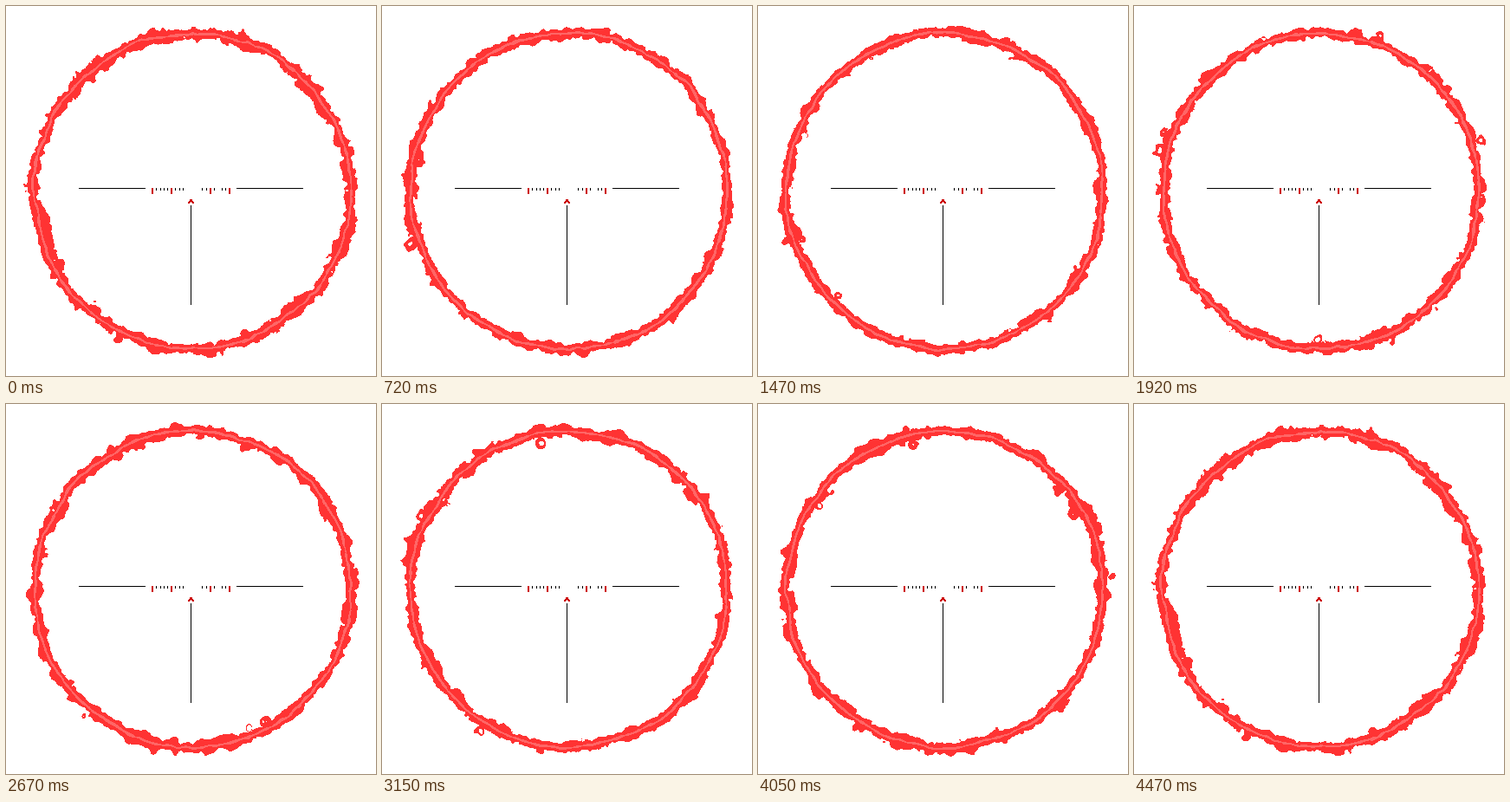
These frames come from a looping animation (427x427 px, 4.5 s). An HTML page with a canvas:

```html
<!DOCTYPE html>
<html lang="en">
<head>
<meta charset="utf-8">
<title>Burning scope</title>
<style>
html, body { margin: 0; width: 100%; height: 100%; overflow: hidden; background: #fff; }
canvas { display: block; width: 100vw; height: 100vh; image-rendering: pixelated; }
</style>
</head>
<body>
<canvas id="stage" width="427" height="427"></canvas>
<script>
const SIZE = 427, LOOP = 4500, STEP = 30;
const CX = 215, CY = 213, RADIUS = 182.5;
const WHITE = 0xffffffff, RED = 0xff3333ff, GLOW = 0xff6666ff;
const ctx = document.getElementById('stage').getContext('2d');
const image = ctx.createImageData(SIZE, SIZE);
const pixels = new Uint32Array(image.data.buffer);

let seed = 71;
const random = () => (seed = seed * 16807 % 2147483647) / 2147483647;
const perm = Uint8Array.from({ length: 256 }, () => random() * 256);
const values = Float32Array.from({ length: 256 }, () => random() * 2 - 1);

const ease = u => u * u * (3 - 2 * u);
const mix = (a, b, u) => a + (b - a) * u;

// Value noise in x, y and time; time wraps after `period` cells
function noise(x, y, phase, cell, period) {
  x /= cell;
  y /= cell;
  const z = phase * period;
  const xi = Math.floor(x), yi = Math.floor(y), zi = Math.floor(z);
  const u = ease(x - xi), v = ease(y - yi);
  const x0 = perm[(xi + period * 9) & 255], x1 = perm[(xi + 1 + period * 9) & 255];
  const a = perm[(x0 + yi) & 255], b = perm[(x1 + yi) & 255];
  const c = perm[(x0 + yi + 1) & 255], d = perm[(x1 + yi + 1) & 255];
  const slice = k => mix(
    mix(values[perm[(a + k) & 255]], values[perm[(b + k) & 255]], u),
    mix(values[perm[(c + k) & 255]], values[perm[(d + k) & 255]], u), v);
  return mix(slice(zi % period), slice((zi + 1) % period), ease(z - zi));
}

const band = [];
for (let y = 0; y < SIZE; y++) {
  for (let x = 0; x < SIZE; x++) {
    const offset = Math.hypot(x - CX, y - CY) - RADIUS;
    if (Math.abs(offset) < 24) band.push({ x, y, offset });
  }
}

// Short-lived hollow flares that break out on either side of the ring
const flares = Array.from({ length: 36 }, () => {
  const angle = random() * Math.PI * 2;
  const reach = RADIUS + (random() < 0.5 ? -1 : 1) * (7 + 5 * random());
  return {
    x: CX + reach * Math.cos(angle),
    y: CY + reach * Math.sin(angle),
    birth: random(),
    size: 4 + 4 * random()
  };
});

function activeFlares(phase) {
  const life = 0.1;
  return flares.flatMap(({ x, y, birth, size }) => {
    const age = (phase - birth + 1) % 1 / life;
    return age < 1 ? [{ x, y, r: size * Math.sin(Math.PI * age), hole: size * (age - 0.3) }] : [];
  });
}

function ringColor({ x, y, offset }, phase, active) {
  const s = offset - 2.4 * noise(x, y, phase, 30, 9) - 1.4 * noise(x, y, phase, 9, 12);
  const depth = Math.abs(s);
  const rough = noise(x, y, phase, 5, 14);
  if (depth < 1.3 + 0.8 * rough) return GLOW;
  const bump = Math.max(0, noise(x, y, phase, 13, 10));
  const width = 5.6 + 8 * bump + 3 * rough + 1.2 * noise(x, y, phase, 2.5, 16);
  let color = depth < width ? RED : WHITE;
  for (const flare of active) {
    const d = Math.hypot(x - flare.x, y - flare.y) + 3 * rough;
    if (d < flare.hole && depth > 4) color = WHITE;
    else if (d < flare.r) color = RED;
  }
  return color;
}

function drawReticle() {
  ctx.fillStyle = '#000';
  ctx.fillRect(84, 210, 77, 1);
  ctx.fillRect(266, 210, 77, 1);
  ctx.fillRect(213, 230, 1, 115);

  const isGap = i => i > 8 && i < 13 || i === 17;
  for (let i = 0; i <= 20; i++) {
    if (isGap(i)) continue;
    const x = 168.6 + 4.45 * i;
    const major = i % 5 === 0;
    ctx.fillStyle = major ? '#c00' : '#000';
    if (major) ctx.fillRect(Math.floor(x), 210, 2, 7);
    else ctx.fillRect(Math.round(x), 210, 1, 3);
  }

  ctx.fillStyle = '#c00';
  for (let i = 0; i < 4; i++) {
    const spread = Math.max(0, i - 1);
    ctx.fillRect(212 - spread, 223 + i, 2, 2);
    ctx.fillRect(213 + spread, 223 + i, 2, 2);
  }
}

function draw(time) {
  const phase = time / LOOP, active = activeFlares(phase);
  pixels.fill(WHITE);
  for (const p of band) pixels[p.y * SIZE + p.x] = ringColor(p, phase, active);
  ctx.putImageData(image, 0, 0);
  drawReticle();
}

let shown = -1;
function tick() {
  const time = Math.floor(performance.now() % LOOP / STEP) * STEP;
  if (time !== shown) draw(shown = time);
  requestAnimationFrame(tick);
}
tick();
</script>
</body>
</html>
```
